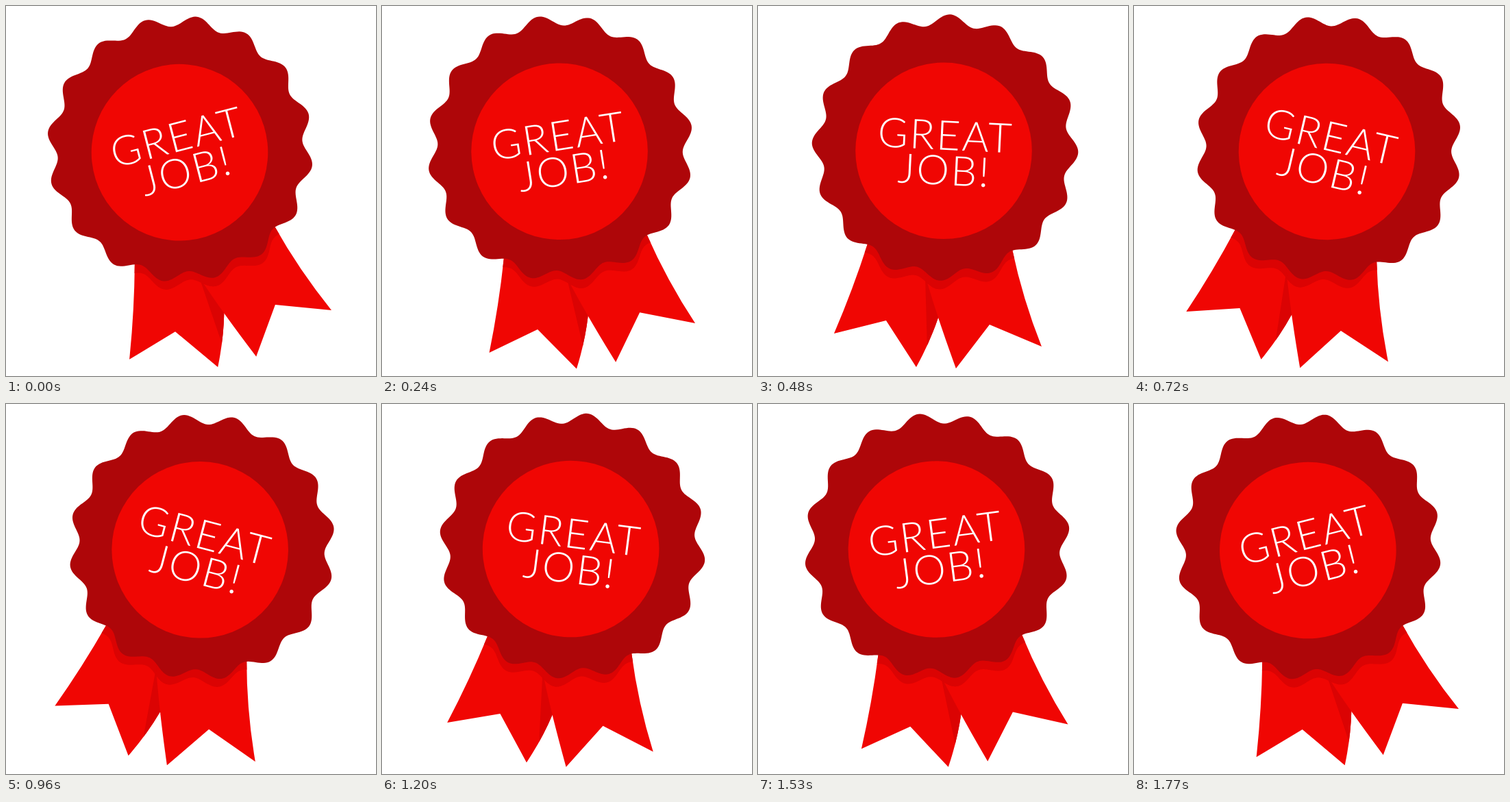
An HTML page that plays this animation: 540 by 540 pixels, repeating every 1800 ms.

```html
<!DOCTYPE html>
<html lang="en">
<head>
<meta charset="utf-8">
<title>Great job rosette</title>
<style>
  html, body { margin: 0; width: 100%; height: 100%; overflow: hidden; background: #fff; }
  svg { display: block; width: 100%; height: 100%; }
  .bright { fill: #f00603; }
  .dark { fill: #ae0609; }
  .shade { fill: #db0303; }
  text {
    font: 300 60px Lato, Inter, sans-serif;
    letter-spacing: 2.6px;
    text-anchor: middle;
    fill: #fff;
  }
</style>
</head>
<body>
<svg viewBox="0 0 540 540">
  <defs>
    <path id="edge"/>
    <path id="left" d="M160 340V347Q138.500 414 111 478L187 459L231 527Q251 491 263 455L290 340Z"/>
    <path id="right" d="M230 340L246 400Q261 452 289 529L338 465L414 497Q386.500 428 371 355V340Z"/>
    <clipPath id="inLeft"><use href="#left"/></clipPath>
    <clipPath id="inRight"><use href="#right"/></clipPath>
  </defs>
  <g id="badge">
    <use href="#left" class="bright"/>
    <path class="shade" clip-path="url(#inLeft)" d="M244 390L247 500H290V390Z"/>
    <use href="#right" class="bright"/>
    <g class="shade" clip-path="url(#inLeft)"><use href="#edge" x="-1.500" y="12.500"/></g>
    <g class="shade" clip-path="url(#inRight)"><use href="#edge" x="-1.500" y="12.500"/></g>
    <use href="#edge" class="dark"/>
    <circle class="bright" cx="271" cy="211.300" r="128.800"/>
    <g transform="rotate(2.8 273 208.500)">
      <text x="273" y="209.800">GREAT</text>
      <text x="273.500" y="261">JOB!</text>
    </g>
  </g>
</svg>
<script>
  const LOOP = 1800, STEP = 30;
  const RISE = 870, FALL = 960; // the fall is cut short by the loop
  const LOW = -17.3, SWING = 30;
  const badge = document.getElementById('badge');

  // Scalloped outline
  function scallop(cx, cy, radius, depth, lobes, tilt) {
    const points = [];
    for (let deg = 0; deg < 360; deg += 0.75) {
      const a = deg * Math.PI / 180;
      const r = radius + depth * Math.cos(lobes * a);
      const b = a + tilt * Math.PI / 180;
      points.push((cx + r * Math.cos(b)).toFixed(2) + ' ' + (cy + r * Math.sin(b)).toFixed(2));
    }
    return 'M' + points.join('L') + 'Z';
  }

  const ease = u => u * u * (3 - 2 * u);

  function angleAt(t) {
    const lift = t < RISE ? ease(t / RISE) : 1 - ease((t - RISE) / FALL);
    return LOW + SWING * lift;
  }

  function draw() {
    const t = Math.floor((performance.now() - start) % LOOP / STEP) * STEP;
    badge.setAttribute('transform', `rotate(${angleAt(t).toFixed(3)} 270 270)`);
    requestAnimationFrame(draw);
  }

  document.getElementById('edge').setAttribute('d', scallop(273, 206.6, 186.6, 7.8, 16, 2.1));
  const start = performance.now();
  draw();
</script>
</body>
</html>
```
